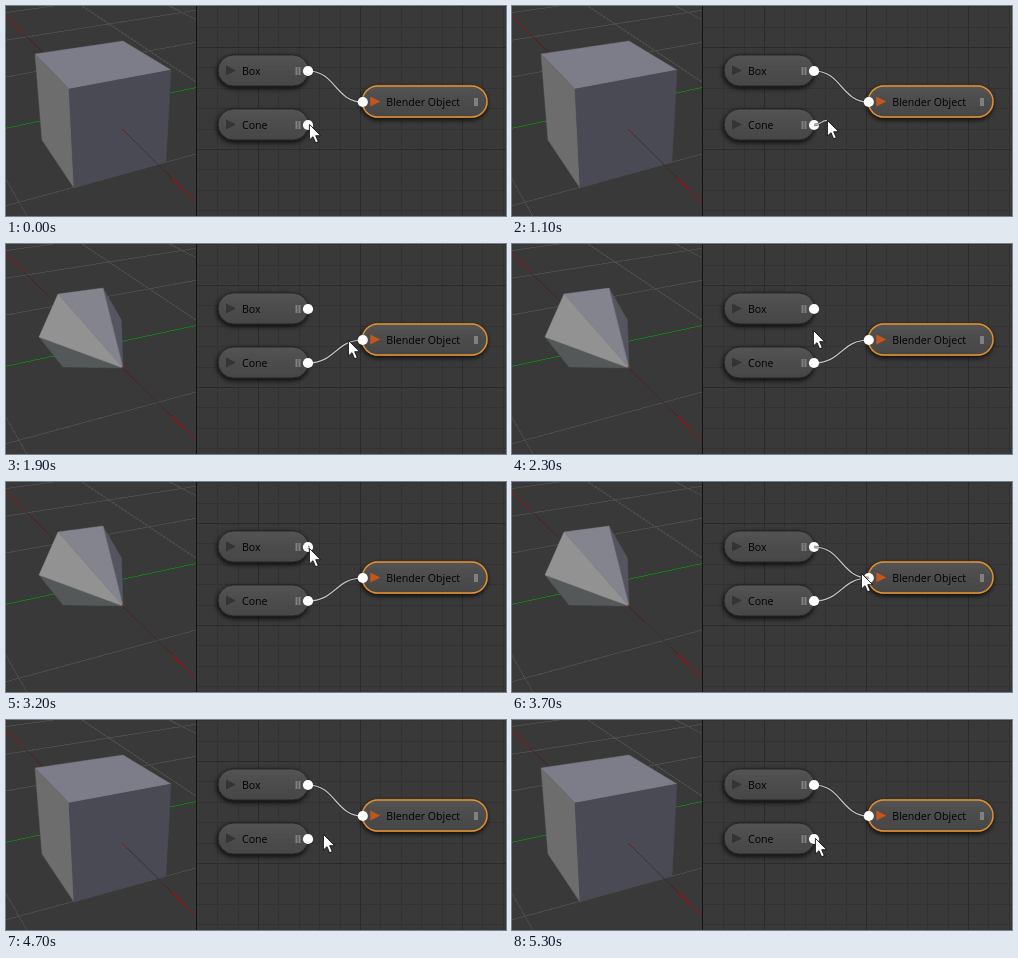
These frames come from a looping animation (500 by 210 pixels, 5600 ms). An HTML page:

```html
<!DOCTYPE html>
<html lang="en">
<head>
<meta charset="utf-8">
<title>Node links</title>
<style>
  html, body { margin: 0; width: 100%; height: 100%; overflow: hidden; background: #393939; }
  svg { display: block; width: 500px; height: 210px; }
  text { font: 10.6px "Open Sans", "Noto Sans", sans-serif; fill: #000; }
  .floor { stroke: #4b4b4b; fill: none; }
  .x-axis { stroke: #9a1010; }
  .x-dim { stroke: #452a2a; }
  .y-axis { stroke: #147d14; }
  .lines { shape-rendering: crispEdges; }
  .mesh polygon { stroke-width: .4; stroke-linejoin: round; }
  .pill { fill: url(#body); stroke: #262626; }
  .active { stroke: #e8922f; stroke-width: 1.4; }
  .grip { fill: #808080; }
  .wire-edge { fill: none; stroke: #1c1c1c; stroke-width: 2.6; stroke-opacity: .6; }
  .wire-core { fill: none; stroke: #c4c4c4; stroke-width: 1.2; }
  .socket { fill: #fff; }
</style>
</head>
<body>
<svg viewBox="0 0 500 210">
  <defs>
    <linearGradient id="body" x2="0" y2="1">
      <stop offset="0" stop-color="#535353"/>
      <stop offset="1" stop-color="#464646"/>
    </linearGradient>
    <filter id="shade" x="-20%" y="-50%" width="140%" height="220%">
      <feDropShadow dx="-.5" dy="2" stdDeviation="2.6" flood-color="#000" flood-opacity=".85"/>
    </filter>
    <clipPath id="view"><rect width="190" height="210"/></clipPath>
  </defs>

  <g clip-path="url(#view)">
    <rect width="190" height="210" fill="#393939"/>
    <g class="lines">
      <path id="floor" class="floor"/>
      <path class="y-axis" d="M0 122.3 L190 81.5"/>
      <path class="x-dim" d="M0 10.2 L190 196"/>
      <path class="x-axis" d="M0 10.2 L18.5 28.3 M166 172.5 L190 196"/>
    </g>
    <g id="box" class="mesh"></g>
    <g id="cone" class="mesh"></g>
  </g>

  <rect x="191" width="309" height="210" fill="#393939"/>
  <rect x="190" width="1" height="210" fill="#121212"/>
  <path id="fine" stroke="#323232"/>
  <path id="coarse" stroke="#2b2b2b"/>

  <g id="nodes"></g>
  <g id="wires"></g>
  <g id="sockets"></g>
  <g id="dragged"></g>
  <path id="cursor" d="M0 0 V15.6 L3.6 12.3 L6.2 18.4 L8.9 17.2 L6.3 11.3 H11.2 Z"
        fill="#fff" stroke="#111" stroke-width=".9"/>
</svg>
<script>
const NS = "http://www.w3.org/2000/svg";
const $ = id => document.getElementById(id);
function add(parent, tag, attrs, text) {
  const el = document.createElementNS(NS, tag);
  for (const k in attrs) el.setAttribute(k, attrs[k]);
  if (text) el.textContent = text;
  return parent.appendChild(el);
}

// Ground plane to screen
function project(x, y) {
  const w = 1 - .068 * x + .034 * y;
  return ((94 + 13.9 * x + 49 * y) / w).toFixed(1) + " " +
         ((102 + 12.7 * x - 6.55 * y) / w).toFixed(1);
}
const CELL = 2.4, REACH = 4 * CELL;
let floor = "";
for (let i = -4; i <= 4; i++) {
  if (!i) continue;
  const c = i * CELL;
  floor += `M${project(c, -REACH)}L${project(c, REACH)}M${project(-REACH, c)}L${project(REACH, c)}`;
}
$("floor").setAttribute("d", floor);

function face(mesh, points, fill) {
  add($(mesh), "polygon", { points, fill, stroke: fill });
}
face("box", "29,48 117,35 165,64 63,83", "#7d7d89");
face("box", "29,48 63,83 68,182 36,134", "#6d6d6d");
face("box", "63,83 165,64 160,156 68,182", "#4a4a55");
add($("box"), "path", { d: "M117 124 L152 158.5", stroke: "#34343a" });
add($("box"), "path", { d: "M116 123 L121 128", stroke: "#8c1414" });
face("cone", "33,93 117,124 57,123", "#555858");
face("cone", "97,44 115.5,76 117,124", "#55555f");
face("cone", "52,50 97,44 117,124", "#84848f");
face("cone", "33,93 52,50 117,124", "#929292");
add($("cone"), "circle", { cx: 116.5, cy: 123.5, r: .9, fill: "#a01818" });

// Editor grid: every fifth line is darker
const STEP = 20.4;
function gridLines(id, keep) {
  let d = "";
  for (let i = -2; i < 13; i++) {
    if (!keep(i)) continue;
    const x = Math.round(252 + i * STEP) + .5, y = Math.round(41 + i * STEP) + .5;
    if (x > 192) d += `M${x} 0V210`;
    d += `M191 ${y}H500`;
  }
  $(id).setAttribute("d", d);
}
gridLines("fine", i => i % 5);
gridLines("coarse", i => i % 5 === 0);

function node(label, x, y, width, active) {
  const g = add($("nodes"), "g", { transform: `translate(${x} ${y})` });
  add(g, "rect", { width, height: 31, rx: 15.5, class: active ? "pill active" : "pill", filter: "url(#shade)" });
  add(g, "path", { d: "M8 10.5 L18 15.5 L8 20.5 Z", fill: active ? "#c3561a" : "#343434" });
  add(g, "text", { x: 24, y: 19.7 }, label);
  if (active) add(g, "rect", { x: width - 13, y: 12, width: 4, height: 8, class: "grip" });
  else for (const dx of [13, 10]) {
    add(g, "rect", { x: width - dx, y: 12, width: 2, height: 8, class: "grip" });
  }
}
node("Box", 212, 49, 90.5);
node("Cone", 212, 103, 90.5);
node("Blender Object", 356.3, 80, 124.7, true);

const OUT = { box: [302, 65], cone: [302, 119] }, INPUT = [356.8, 96];
for (const [cx, cy] of [OUT.box, OUT.cone, INPUT]) {
  add($("sockets"), "circle", { cx, cy, r: 5.1, class: "socket" });
}

function makeWire(layer) {
  return ["wire-edge", "wire-core"].map(c => add($(layer), "path", { class: c }));
}
const link = makeWire("wires"), drag = makeWire("dragged");
function setWire(wire, from, end) {
  let d = "";
  if (end) {
    const [x, y] = from, [u, v] = end, h = Math.abs(u - x) / 2;
    d = `M${x} ${y}C${x + h} ${y} ${u - h} ${v} ${u} ${v}`;
  }
  wire.forEach(p => p.setAttribute("d", d));
}

// Pointer path: time, x, y
const PATH = [
  [0, 303, 118], [1000, 303, 118], [1400, 352, 101], [1500, 352, 101], [1600, 352, 99],
  [1800, 352, 99], [2300, 301, 86], [2400, 293, 72], [2800, 303, 66], [3200, 303, 66],
  [3700, 349, 91], [4200, 349, 91], [4800, 311, 118], [5300, 303, 118], [5600, 303, 118]
];
function pointer(t) {
  const i = PATH.findIndex(p => p[0] > t);
  const [t0, x0, y0] = PATH[i - 1], [t1, x1, y1] = PATH[i];
  const k = (t - t0) / (t1 - t0);
  return [x0 + (x1 - x0) * k, y0 + (y1 - y0) * k].map(v => Math.round(v) + .4);
}

function draw(now) {
  const t = Math.floor(now % 5600 / 100) * 100;
  const pos = pointer(t);
  const coneOn = t >= 1900 && t < 4100;
  $("box").style.display = coneOn ? "none" : "";
  $("cone").style.display = coneOn ? "" : "none";
  setWire(link, coneOn ? OUT.cone : OUT.box, INPUT);

  let end = null;
  if (t >= 800 && t < 1900) end = t < 1400 ? pos : INPUT;
  if (t >= 3200 && t < 4100) end = t < 3700 ? pos : INPUT;
  setWire(drag, coneOn ? OUT.box : OUT.cone, end);

  $("cursor").setAttribute("transform", `translate(${pos})`);
}
const start = performance.now();
(function tick() {
  draw(performance.now() - start);
  requestAnimationFrame(tick);
})();
</script>
</body>
</html>
```
